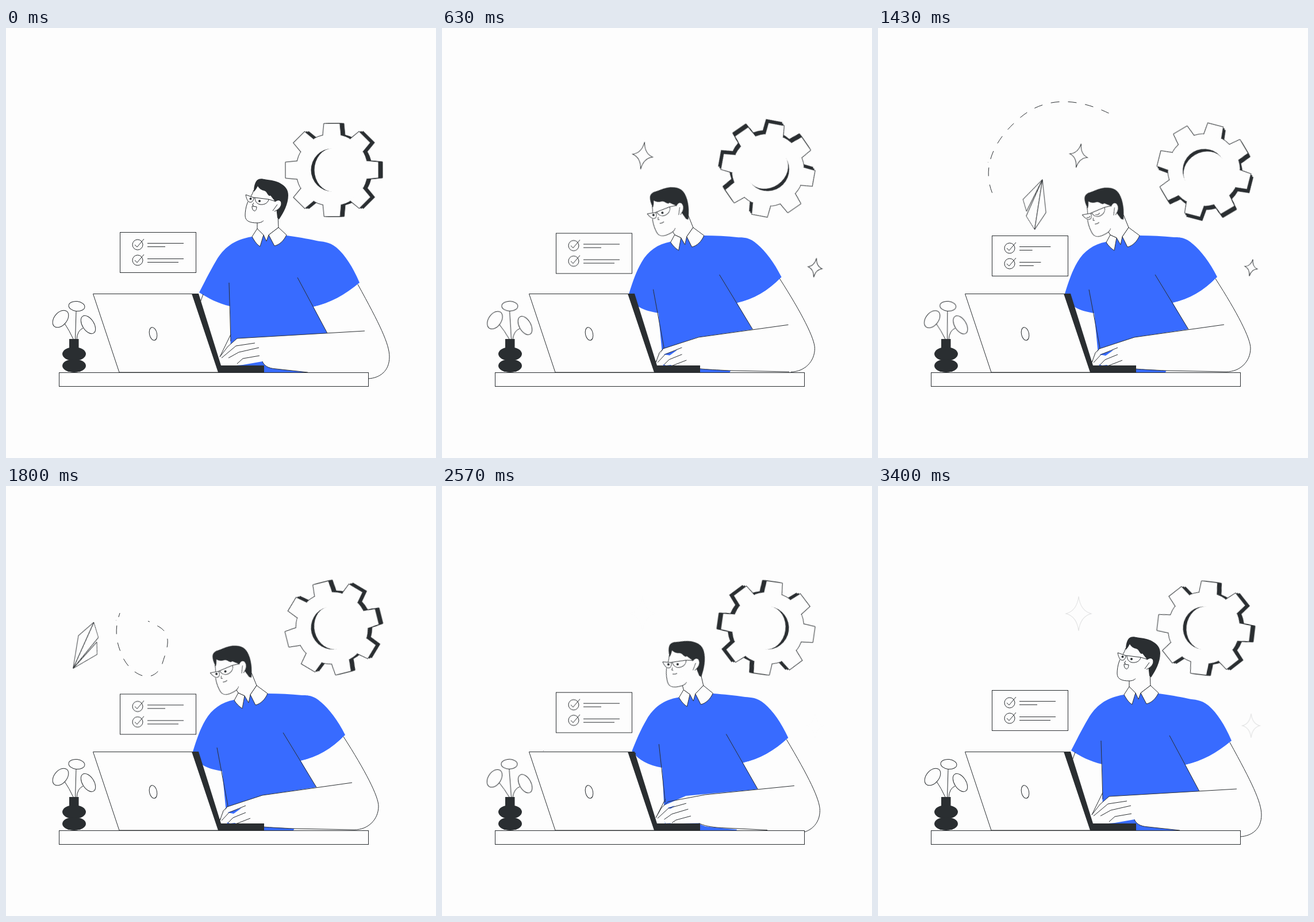
Recreate the animation shown at these times as an HTML page without scripts. Size 748 by 748 pixels, loop 3430 ms.

```html
<!DOCTYPE html>
<html lang="en">
<head>
<meta charset="utf-8">
<title>Working at the desk</title>
<style>
:root {
  --paper: #fdfdfd;
  --ink: #2a2e31;
  --blue: #386bff;
  --loop: 3.43s;
  --route: path("M540 310 C505 260 462 178 403 149 C340 118 285 122 245 158 C205 192 178 240 200 290 C210 322 252 352 271 312 C277 290 292 262 268 246 C250 235 225 222 195 232 C150 252 122 300 120 343 C118 400 140 440 185 466 C215 485 250 510 260 550");
}
html, body { margin: 0; width: 100%; height: 100%; overflow: hidden; background: var(--paper); }
svg { display: block; width: 100vw; height: 100vh; fill: var(--paper); stroke: var(--ink); stroke-width: 1; }
.line { fill: none; }
.ink { fill: var(--ink); stroke: none; }
.blue { fill: var(--blue); stroke: none; }

/* gear */
#gear { transform: translate(567px, 247px); }
#wheel { animation: spin var(--loop) linear infinite; }
.dark { fill: var(--ink); }
@keyframes spin {
  0% { transform: rotate(0deg); }
  10.79% { transform: rotate(-67.5deg); }
  27.11% { transform: rotate(-190deg); }
  41.69% { transform: rotate(-300.4deg); }
  63.27% { transform: rotate(-447.5deg); }
  85.42% { transform: rotate(-607.5deg); }
  99.13% { transform: rotate(-713deg); }
  100% { transform: rotate(-720deg); }
}

/* stars */
#spark { vector-effect: non-scaling-stroke; }
.star { animation: twinkle .8575s linear infinite; }
@keyframes twinkle {
  0%, 25% { transform: rotate(45deg) scale(0); opacity: 0; }
  42% { transform: rotate(45deg) scale(.32); opacity: .6; }
  53% { transform: rotate(26deg) scale(.46); opacity: .75; }
  67% { transform: rotate(12deg) scale(.71); opacity: 1; }
  85% { transform: rotate(2deg) scale(.95); opacity: .8; }
  97% { transform: rotate(0deg) scale(1); opacity: .12; }
  100% { transform: rotate(0deg) scale(1); opacity: 0; }
}

/* paper plane */
.route { d: var(--route); fill: none; }
#plane { offset-path: var(--route); offset-rotate: auto; animation: fly var(--loop) linear infinite; }
@keyframes fly {
  0% { opacity: 0; offset-distance: 3.8%; animation-timing-function: step-end; }
  24.8% { opacity: 1; offset-distance: 3.8%; }
  27.11% { offset-distance: 10.2%; }
  41.69% { offset-distance: 53.8%; }
  63.27% { offset-distance: 90.3%; }
  69%, 100% { opacity: 1; offset-distance: 100%; }
}
#reveal { stroke: #fff; stroke-width: 6; animation: trail var(--loop) linear infinite; }
@keyframes trail {
  0%, 27.11% { stroke-dasharray: 0 1185; stroke-dashoffset: 0; }
  41.69% { stroke-dasharray: 317 1185; stroke-dashoffset: -215; }
  63.27% { stroke-dasharray: 214 1185; stroke-dashoffset: -709; }
  75%, 100% { stroke-dasharray: 0 1185; stroke-dashoffset: -1060; }
}

/* checklist */
#card { animation: bob 1.715s .05s ease-in-out infinite alternate; }
@keyframes bob { to { transform: translateY(6.5px); } }
.entry { stroke-dasharray: 1 2; animation: write var(--loop) linear infinite; }
.entry:nth-of-type(2) { animation-delay: .06s; }
.entry:nth-of-type(3) { animation-delay: .12s; }
.entry:nth-of-type(4) { animation-delay: .18s; }
@keyframes write {
  0%, 28% { stroke-dasharray: 1 2; }
  30.5% { stroke-dasharray: 0 2; }
  43.5%, 100% { stroke-dasharray: 1 2; }
}

/* plant */
.stem { transform-origin: 118px 541px; animation: sway .8575s ease-in-out infinite alternate; }
@keyframes sway { to { transform: rotate(var(--turn)); } }

/* man: upright in the markup, leaning in the keyframes */
.pose { animation: var(--loop) cubic-bezier(.3, 0, .1, 1) infinite; }
#torso { animation-name: torso; }
#side { animation-name: side; }
#gap { animation-name: gap; }
#arm { animation-name: arm; }
#folds { animation-name: folds; }
#neck { animation-name: neck; }
#collar { animation-name: collar; }
#head { animation-name: shift; }
#nod { transform-origin: 454.5px 359.5px; animation-name: nod; }
@keyframes torso { 23.3%, 65.6% { d: path("M397 372 C375 376 358 388 347 407 C337 424 332 440 325 462 C333 485 350 492 376 496 L386 599 L500 599 L540 524 L513 478 C541 472 567 457 590 433 C577 407 562 388 548 376 C535 364 525 364 515 364 C495 362 475 361 455 361 L425 363 L422 377 L415 365Z"); } }
@keyframes side { 23.3%, 65.6% { d: path("M331 465 L326 480 M386 556 L373 580 M367 455 L386 556"); } }
@keyframes gap { 23.3%, 65.6% { d: path("M385 568 L410 560 L396 570Z"); } }
@keyframes arm { 23.3%, 65.6% { d: path("M513 478 C541 472 567 457 588 435 C625 495 648 540 648 557 C648 580 630 598 606 598 L500 596 L470 594 C460 594 452 593 448 593 L425 588 L402 588 L398 586 L390 587 L384 585 L374 586 L374 576 L385 558 L446 538 L540 524Z"); } }
@keyframes folds { 23.3%, 65.6% { d: path("M587 436 C625 495 648 540 648 557 C648 580 630 598 606 598 M606 598 L500 596 C480 595 460 594 448 593 M482 429 L540 524 M602 516 L446 538 L385 558 L378 565 L372 582 M417 556 L388 568 L375 582 M417 568 L395 577 L386 586 M425 578 L402 587 L398 588"); } }
@keyframes neck { 23.3%, 65.6% { d: path("M398 350 L404 360 L415 365 L422 377 L425 363 L436 347 L427 325"); } }
@keyframes collar { 23.3%, 65.6% { d: path("M404 360 L397 373 C401 379 406 384 411 387 L415 365Z M436 347 L455 361 C451 371 443 379 434 381 L425 363Z"); } }
@keyframes shift { 23.3%, 65.6% { transform: translate(-32px, 7px); } }
@keyframes nod {
  0% { animation-timing-function: cubic-bezier(.4, 0, .4, 1); }
  23.3%, 65.6% { transform: rotate(-30deg); }
}

/* face switches */
.switch { animation: var(--loop) step-end infinite; }
#smile { animation-name: smile; }
#lips { animation-name: lips; }
#pupils { animation-name: pupils; }
#lids { animation-name: lids; }
@keyframes smile { 0%, 76% { opacity: 1; } 5% { opacity: 0; } }
@keyframes lips { 0%, 76% { opacity: 0; } 5% { opacity: 1; } }
@keyframes pupils { 0%, 44% { opacity: 1; } 40% { opacity: 0; } }
@keyframes lids { 0%, 44% { opacity: 0; } 40% { opacity: 1; } }
</style>
</head>
<body>
<svg viewBox="0 0 748 748">
  <defs>
    <path id="tooth" d="M-16-60 L-14-81 H14 L16-60"/>
    <g id="pair"><use href="#tooth"/><use href="#tooth" transform="rotate(180)"/></g>
    <g id="cog">
      <circle r="63"/>
      <use href="#pair"/>
      <use href="#pair" transform="rotate(45)"/>
      <use href="#pair" transform="rotate(90)"/>
      <use href="#pair" transform="rotate(135)"/>
    </g>
    <path id="spark" d="M0-30 Q3-5 22 0 Q3 5 0 30 Q-3 5 -22 0 Q-3-5 0-30Z"/>
    <g id="tick" class="line"><circle r="9"/><path d="M-5 0 L-1 4 L11-10"/></g>
    <mask id="window" maskUnits="userSpaceOnUse" x="0" y="0" width="748" height="748">
      <path id="reveal" class="route" pathLength="1185"/>
    </mask>
  </defs>

  <g mask="url(#window)"><path class="route" pathLength="1185" stroke-dasharray="15 15" stroke-dashoffset="-5"/></g>
  <g id="plane" stroke-linejoin="round">
    <path d="M45 0 L-24-8 L-42 13Z"/>
    <path d="M45 0 L2-22 L-16-10Z"/>
    <path d="M45 0 L-42 13 L-8 23Z"/>
  </g>

  <g transform="translate(349 222)"><g class="star"><use href="#spark"/></g></g>
  <g transform="translate(649 417) scale(.7)"><g class="star"><use href="#spark"/></g></g>

  <g id="gear"><g id="wheel">
    <use href="#cog" class="dark" x="7"/>
    <use href="#cog" class="dark" x="3.5"/>
    <use href="#cog"/>
    <path class="ink" d="M1-37.5 A37.5 37.5 0 0 0 1 37.5 A31.5 37.5 0 0 1 1-37.5Z"/>
  </g></g>

  <g id="card">
    <rect x="198.5" y="355.5" width="132" height="70"/>
    <use href="#tick" x="229" y="377"/>
    <use href="#tick" x="229" y="404"/>
    <g class="line">
      <path class="entry" pathLength="1" d="M246 374.5 H309"/>
      <path class="entry" pathLength="1" d="M246 380.5 H277"/>
      <path class="entry" pathLength="1" d="M246 401.5 H309"/>
      <path class="entry" pathLength="1" d="M246 407.5 H300"/>
    </g>
  </g>

  <path id="torso" class="pose blue" d="M428 363 C395 368 378 384 366 404 C352 428 345 443 336 460 C352 470 368 479 390 484 L391 599 L525 599 L559 531 L535 485 C563 479 590 464 615 443 C603 415 590 395 575 382 C562 371 550 372 540 370 C522 366 508 364 488 361 L457 360 L453 371 L448 360Z"/>
  <path id="side" class="pose line" d="M343 463 L337 480 M391 533 L372 572 M388 443 L391 545"/>
  <path id="arm" class="pose" stroke="none" d="M535 485 C563 479 590 464 613 445 C650 515 667 550 667 572 C667 597 650 609 630 610 L525 599 L470 593 C455 592 449 587 446 580 L412 586 L401 587 L395 587 L388 587 L387 573 L374 575 L372 572 L386 554 L402 540 L559 531Z"/>
  <path id="gap" class="pose blue" d="M400 552 L400 552 L400 552Z"/>
  <path id="folds" class="pose line" d="M612 446 C650 515 667 550 667 572 C667 597 650 609 630 610 M525 599 L470 593 C455 592 449 587 446 580 M507 434 L559 531 M624 527 L470 536 L402 540 L386 554 L372 572 M433 548 L400 553 L375 574 M440 556 L405 564 L387 574 M441 570 L412 575 L402 584"/>
  <path id="neck" class="pose" d="M437 335 L437 349 L448 360 L453 371 L457 360 L474 347 L473 325"/>
  <path id="collar" class="pose" d="M437 349 L428 363 C433 372 437 377 442 380 L448 360Z M474 347 L488 360 C483 370 476 377 467 379 L457 360Z"/>

  <g id="head" class="pose"><g id="nod" class="pose">
    <path d="M431 282 C429 289 424 296 420 304 C417 312 416 320 416 326 C416 336 424 339 437 339 C443 339 446 337 448 335"/>
    <path class="ink" d="M431 285 C431 276 433 268 437 264.5 C441 261 446 262 452 263.5 C462 264.5 470 266 477 270 C486 275 491 281 491 291 C491 306 483 321 475 333 L472 330 L470 312 L467 300 C463 296 460 290 459 292 C455 292 454 284 449 283 C444 282 440 279 438 275 C436 279 434 282 431 285Z"/>
    <path d="M463 319 C462 308 467 300 475 300 C480 301 480 308 476 313 C472 317 468 319 463 319Z" stroke="none"/>
    <path class="line" d="M464 318 L472 307 M466 301 C470 298 479 298 479 305 C479 312 472 317 467 319"/>
    <path d="M417 290 L431 295 C431 300 428 304 424 303 C420 302 418 296 417 290Z M433 295 L457 298 C456 304 450 308 442 307 C436 306 433 301 433 295Z"/>
    <path class="line" d="M431 295 H433 M457 298 L467 301 M431 304 L428.5 308 L431 309"/>
    <g id="pupils" class="switch ink"><circle cx="425.5" cy="297" r="2"/><circle cx="441" cy="301" r="2"/></g>
    <path id="lids" class="switch line" d="M421 298 q4 3 7 1 M437 301 q4 4 8 1"/>
    <path id="smile" class="switch" d="M428 310 L436 311 C436 316 434 319 431.5 318 C429 317 428 314 428 310Z"/>
    <path id="lips" class="switch line" d="M428 315 Q432 317 436 316"/>
  </g></g>

  <rect x="92.5" y="599.5" width="538" height="24"/>
  <path d="M151.5 462.5 H324 L370 599 H197Z"/>
  <path class="ink" d="M323 462 H335 L374 587 H449 V599 H369Z"/>
  <ellipse cx="256" cy="532" rx="6.5" ry="11.5" transform="rotate(-12 256 532)"/>

  <g class="stem" style="--turn:-6deg">
    <path class="line" d="M117 541 Q110 526 102 514"/>
    <ellipse cx="95" cy="506" rx="17" ry="11" transform="rotate(-50 95 506)"/>
  </g>
  <g class="stem" style="--turn:-6deg">
    <path class="line" d="M120.5 543 L122 493"/>
    <ellipse cx="123" cy="484" rx="14" ry="8.5" transform="rotate(6 123 484)"/>
  </g>
  <g class="stem" style="--turn:4deg">
    <path class="line" d="M123 542 Q124 526 134 522"/>
    <ellipse cx="143" cy="516" rx="17.5" ry="10" transform="rotate(57 143 516)"/>
  </g>
  <g class="ink">
    <rect x="110" y="541" width="16.5" height="18"/>
    <ellipse cx="118.5" cy="567" rx="20.5" ry="12"/>
    <ellipse cx="118.5" cy="587.5" rx="20.5" ry="11.5"/>
  </g>
</svg>
</body>
</html>
```
